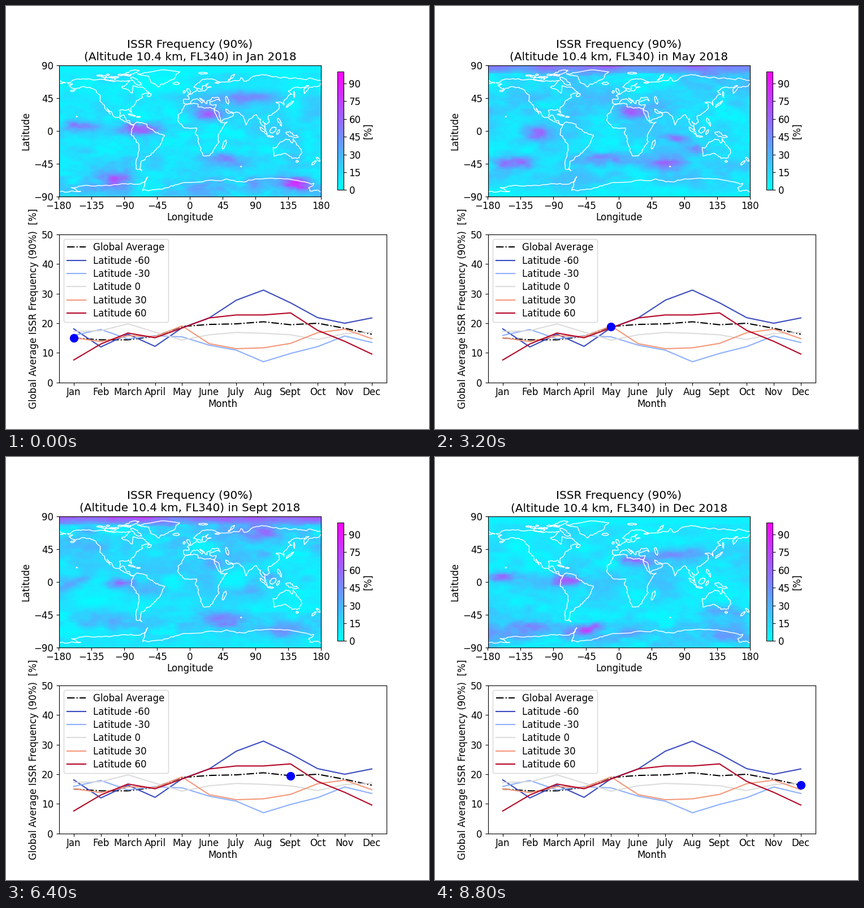
Write a matplotlib script that moves like this. It is 748 px wide and 748 px high and loops after 9600 ms.

```python
import numpy as np
import matplotlib.pyplot as plt
from matplotlib.animation import FuncAnimation

plt.rcParams.update({
    "font.family": "DejaVu Sans", "font.size": 12, "xtick.major.pad": 2.5,
    "legend.labelspacing": 0.32, "legend.borderpad": 0.36,
})

MONTHS = "Jan Feb March April May June July Aug Sept Oct Nov Dec".split()
GLOBAL = [15.0, 14.4, 14.4, 15.6, 18.9, 19.6, 19.8, 20.5, 19.5, 20.0, 18.3, 16.3]
ZONAL = {
    -60: [18.1, 12.0, 16.3, 12.2, 18.5, 21.8, 27.8, 31.2, 26.9, 21.9, 20.0, 21.8],
    -30: [15.9, 17.9, 14.7, 15.8, 15.4, 12.6, 10.9, 7.0, 9.8, 12.1, 15.7, 13.5],
    0: [17.2, 17.5, 19.8, 17.0, 14.3, 16.1, 16.9, 16.6, 16.1, 14.5, 16.5, 17.0],
    30: [15.1, 13.8, 15.8, 15.5, 19.1, 13.1, 11.4, 11.7, 13.2, 16.8, 18.0, 14.8],
    60: [7.6, 13.0, 16.7, 15.1, 18.4, 21.8, 22.8, 22.8, 23.5, 17.6, 13.9, 9.6],
}

fig, (map_ax, line_ax) = plt.subplots(2, 1, figsize=(7.48, 7.48), dpi=100)

# Humid regions of a month: longitude, latitude, half width, strength
regions = {}


def month(name, *spots):
    regions[MONTHS.index(name)] = spots


month("Jan", (-150, 8, 20, 42), (-70, 4, 27, 60), (22, 26, 22, 35), (70, 46, 60, 28),
      (50, -38, 32, 36), (-100, -63, 35, 34), (147, -72, 20, 50))
month("March", (28, 28, 20, 45), (-155, 6, 20, 40), (-45, 3, 26, 46), (25, -22, 26, 26),
      (15, -43, 18, 43), (-100, -41, 30, 40), (-115, 50, 35, 24))
month("May", (-115, -5, 26, 42), (78, -9, 18, 38), (105, -25, 16, 30), (-150, -41, 24, 40),
      (-15, -38, 40, 40), (60, -44, 40, 28), (20, 27, 22, 35))
month("June", (-101, -7, 23, 78), (-160, -7, 24, 30), (85, -8, 20, 60), (-58, -15, 20, 28),
      (70, 33, 36, 28), (-158, -43, 14, 36), (-80, 76, 30, 28))
month("Aug", (-98, -4, 20, 76), (-57, -11, 26, 40), (-165, -6, 16, 32), (80, -11, 26, 38),
      (75, 36, 38, 26), (35, -60, 20, 22), (130, -70, 22, 26))
month("Oct", (-156, 2, 14, 38), (-90, -1, 22, 40), (45, 25, 32, 36), (108, 5, 16, 38),
      (97, 70, 26, 34), (40, -50, 22, 30))
month("Dec", (-157, 7, 18, 42), (-68, 4, 18, 52), (20, 28, 18, 42), (80, 40, 40, 28),
      (-39, -64, 20, 52), (-110, -66, 40, 32), (145, -42, 35, 26))

lon, lat = np.meshgrid(np.arange(-179.5, 180), np.arange(-89.5, 90))


def hat(size, knots):
    """Smooth weights that stretch `knots` random values over `size` cells."""
    gap = np.abs(np.linspace(0, knots - 1, size)[:, None] - np.arange(knots))
    return 0.5 + 0.5 * np.cos(np.pi * np.minimum(gap, 1))


def noise(rng):
    """Octaves of random clouds, wider than tall, between 0 and 1."""
    total = 0
    for k in range(4):
        rows, cols = 9 * 2 ** k, 10 * 2 ** k
        total = total + 0.6 ** k * (hat(180, rows) @ rng.random((rows, cols))
                                    @ hat(360, cols).T - 0.5)
    return np.clip(0.5 + 0.9 * total, 0, 1)


def field(index):
    rng = np.random.default_rng(40 + index)
    grain, shift_x, shift_y = noise(rng), noise(rng) - 0.5, noise(rng) - 0.5
    spots = regions.get(index)
    if spots is None:
        near = regions[index - 1] + regions[index + 1]
        spots = [(x, y, w, 0.55 * a) for x, y, w, a in near]
    pole = np.clip(42 - 50 * np.cos(np.pi * (index - 0.5) / 6), 6, 68)
    south = 18 + 11 * np.cos(np.pi * index / 3)
    means = [0.85 * ZONAL[z][index] for z in ZONAL]
    value = np.interp(lat + 4 * shift_y, [-90, -75, *ZONAL, 76, 83, 90],
                      [south / 2, south, *means, 8 + pole / 5, pole * 0.75, pole])
    value *= 1 + np.where(lat > 79, 0.25, 1) * (1.5 * grain - 0.75)
    for x, y, width, strength in spots:
        height = np.clip(0.36 * width, 6, 9)
        shape = np.exp(-((lon + 14 * shift_x - x) / width) ** 2
                       - ((lat + 7 * shift_y - y) / height) ** 2)
        value += strength * shape * (0.75 + 0.5 * grain)
    return value


FIELDS = [field(i) for i in range(12)]
image = map_ax.imshow(FIELDS[0], origin="lower", extent=(-180, 180, -90, 90),
                      cmap="cool", vmin=0, vmax=100, interpolation="nearest")
coast_rng = np.random.default_rng(5)


def coast(points):
    """Draw a shoreline through key points, roughened by midpoint displacement."""
    points = np.asarray(points, float)
    for _ in range(3):
        step = np.diff(points, axis=0)
        size = np.minimum(0.11 * np.hypot(*step.T), 0.8)[:, None]
        middle = points[:-1] + step / 2 + size * coast_rng.normal(0, 1, step.shape)
        points = np.insert(points, np.arange(1, len(points)), middle, axis=0)
    map_ax.plot(*points.T, color="white", lw=1)


def shore(*numbers):
    coast(np.reshape(numbers, (-1, 2)))


def island(x, y, length, breadth, tilt):
    turn = np.linspace(0, 2 * np.pi, 9)
    ring = length * np.cos(turn) + 1j * breadth * np.sin(turn)
    ring = ring * np.exp(1j * np.radians(tilt))
    coast(np.column_stack([x + ring.real, y + ring.imag]))


# North America
shore(-168, 66, -156, 71, -128, 70, -95, 68, -82, 69, -87, 64, -94, 60, -82, 53, -79, 52,
      -78, 62, -70, 60, -65, 60, -56, 52, -66, 50, -65, 46, -70, 43, -76, 36, -81, 31,
      -80, 25, -84, 30, -97, 28, -96, 19, -90, 21, -88, 16, -83, 14, -82, 9, -77, 8,
      -85, 11, -95, 16, -105, 20, -114, 31, -110, 23, -117, 32, -124, 41, -123, 48,
      -134, 58, -150, 60, -164, 55, -158, 58, -166, 62, -161, 64, -168, 66)
# South America
shore(-77, 8, -72, 12, -62, 10, -50, 0, -35, -6, -39, -16, -48, -27, -58, -35, -65, -41,
      -69, -52, -66, -55, -74, -52, -73, -38, -70, -19, -81, -5, -80, 1, -77, 8)
# Greenland
shore(-72, 78, -33, 83.5, -14, 81, -22, 71, -43, 60, -53, 66, -57, 75, -72, 78)
# Europe and Siberia
shore(-6, 36, -9, 38, -9, 43, -1, 44, -4, 48, 8, 54, 10, 57, 12, 54, 21, 55, 24, 59,
      29, 60, 22, 61, 25, 65, 18, 62, 17, 57, 11, 58, 5, 60, 14, 68, 27, 71, 41, 67,
      34, 66, 44, 67, 68, 69, 70, 73, 74, 68, 87, 75, 104, 77, 114, 74, 140, 72,
      160, 70, 180, 69)
shore(-180, 69, -170, 66, -180, 65)
# Pacific and southern Asia
shore(180, 65, 178, 62, 163, 59, 157, 51, 156, 57, 163, 62, 142, 59, 135, 54, 140, 50,
      128, 40, 129, 35, 125, 39, 118, 39, 122, 37, 122, 30, 108, 21, 109, 12, 105, 9,
      100, 13, 104, 1, 98, 9, 97, 16, 91, 22, 80, 14, 77, 8, 73, 20, 66, 25, 57, 26,
      49, 30, 52, 24, 60, 22, 44, 13, 35, 28, 33, 30)
# Africa and the Mediterranean
shore(33, 30, 37, 19, 43, 11, 51, 12, 40, -4, 40, -15, 35, -21, 27, -34, 18, -34, 12, -17,
      9, 1, 9, 4, -8, 4, -17, 14, -10, 30, -6, 36, 10, 37, 11, 33, 20, 31, 34, 31, 36, 36,
      27, 37, 27, 40, 41, 41, 38, 46, 31, 46, 28, 42, 23, 40, 23, 37, 19, 42, 13, 45,
      18, 40, 16, 38, 10, 44, 3, 42, -2, 37, -6, 36)
# Australia
shore(142, -11, 146, -19, 153, -26, 150, -37, 140, -38, 136, -34, 131, -31, 116, -35,
      114, -23, 128, -14, 136, -12, 140, -17, 142, -11)
# Antarctica
shore(-180, -84, -150, -83, -163, -78, -140, -75, -100, -74, -68, -73, -58, -63, -62, -74,
      -65, -82, -30, -78, -8, -71, 50, -66, 72, -70, 90, -66, 135, -66, 170, -72,
      163, -78, 165, -83, 180, -84)

ISLANDS = [
    (-80, 21.5, 5, 1, -15), (-71, 19, 2.5, .8, 0), (-74, 68, 9, 3, -35),
    (-110, 71, 8, 2.5, 0), (-80, 80, 10, 2.5, 15), (-56, 49, 3, 2, 30),
    (-19, 65, 4.5, 1.5, 0), (-2, 54.5, 4, 2, -60), (-8, 53.5, 1.8, 1.4, 60),
    (51, 42, 5.5, 2, -75), (57, 73, 6, 1.2, 45), (18, 79, 6, 1.3, 0),
    (47, -19, 6.5, 2, 70), (101, 0, 7, 1.5, -45), (110, -7.5, 4.5, .8, -8),
    (114, 1, 5, 3.5, 45), (121, -2, 3.5, 1.2, 60), (140, -5.5, 9, 2.5, -20),
    (123, 12, 6, 1.5, -65), (137, 36.5, 6.5, 1.3, 40), (143, 50, 4, .8, -85),
    (147, -42, 1.7, 1.3, 0), (176, -39, 3.5, 1.3, -50), (170, -44, 4, 1.3, 45),
    (-155.5, 19.5, .6, .6, 0), (70, -49, .8, .4, 0),
]
for spot in ISLANDS:
    island(*spot)
for x in np.linspace(-124, -84, 8):
    island(x, coast_rng.uniform(73, 77), coast_rng.uniform(2, 5), 1, 0)

map_ax.set(xlim=(-180, 180), ylim=(-90, 90),
           xticks=range(-180, 181, 45), yticks=range(-90, 91, 45))
map_ax.set_xlabel("Longitude", labelpad=1.8)
map_ax.set_ylabel("Latitude", labelpad=3)
bar = fig.colorbar(image, ax=map_ax, shrink=0.8, ticks=range(0, 91, 15))
bar.set_label("[%]", labelpad=2.5)

line_ax.plot(MONTHS, GLOBAL, "-.", color="black", label="Global Average")
for shade, (zone, values) in zip(np.linspace(0, 1, 5), ZONAL.items()):
    line_ax.plot(MONTHS, values, color=plt.cm.coolwarm(shade), label=f"Latitude {zone}")
marker, = line_ax.plot([0], [GLOBAL[0]], "o", color="blue", markersize=10)
line_ax.set_ylim(0, 50)
line_ax.set_xlabel("Month", labelpad=1.8)
line_ax.set_ylabel("Global Average ISSR Frequency (90%)  [%]", labelpad=3)
line_ax.legend(loc="upper left")


def update(index):
    image.set_data(FIELDS[index])
    marker.set_data([index], [GLOBAL[index]])
    map_ax.set_title("ISSR Frequency (90%)\n"
                     f"(Altitude 10.4 km, FL340) in {MONTHS[index]} 2018")
    return image, marker


anim = FuncAnimation(fig, update, frames=12, interval=800, repeat=True)
plt.show()
```
